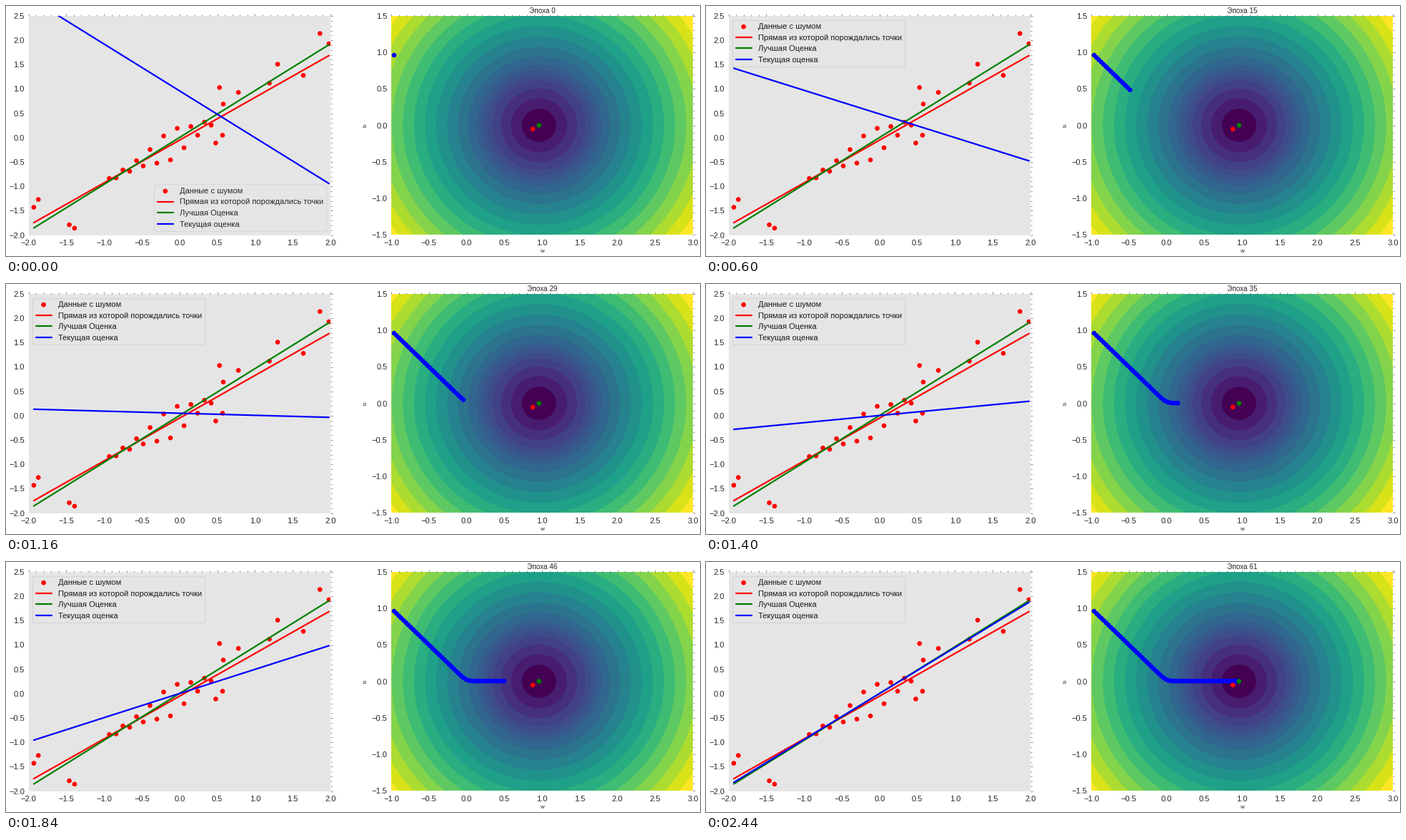
These frames come from a looping animation (971 by 351 pixels, 2480 ms). A matplotlib script:

```python
import numpy as np
import matplotlib.pyplot as plt
from matplotlib.animation import FuncAnimation
from matplotlib.patches import Ellipse
from matplotlib.ticker import AutoMinorLocator, MultipleLocator

W, H, DPI = 971, 351, 80
FRAMES, INTERVAL = 62, 40
LEGEND_SWITCH = 15          # the line leaves the upper left corner here

plt.rcParams.update({
    "font.family": "Liberation Sans",
    "font.size": 10,
    "text.color": "#262626",
    "lines.linewidth": 2,
    "lines.solid_capstyle": "round",
    "legend.scatterpoints": 1,
})

BEST = (0.963, 0.003)
TRUE = (0.878, -0.052)
START = (-0.962, 0.962)
STEP, SOFT = 0.0317, 0.03


def line(w, b, x):
    return w * x + b


def noisy_points():
    """An even zigzag about the true line, widest in the middle, plus outliers."""
    k = np.arange(16)
    x = -0.93 + 0.09 * k
    noise = (-1.0) ** k * 0.3 / (1 + ((k - 9) / 3) ** 2)
    outliers = [(-1.93, -1.43), (-1.87, -1.27), (-1.46, -1.79), (-1.39, -1.86),
                (0.48, -0.11), (0.53, 1.03), (0.57, 0.05), (0.58, 0.69),
                (0.78, 0.93), (1.19, 1.12), (1.3, 1.51), (1.64, 1.28),
                (1.86, 2.14), (1.98, 1.93)]
    return np.vstack([np.c_[x, line(*TRUE, x) + noise], outliers])


def ring_radii():
    """Contour rings of even width that crowd together around the fifth."""
    k = np.arange(1, 19)
    widths = 15.5 - 9 * np.exp(-((k - 5) / 2.2) ** 2)
    return (24 + np.append(0, np.cumsum(widths))) / 105.5


def approach(start, goal, n):
    """Constant steps that slow down softly close to the goal."""
    gap = abs(goal - start) - STEP * n
    return goal - np.sign(goal - start) * SOFT * np.logaddexp(0, gap / SOFT)


points = noisy_points()
span = np.array([points[:, 0].min(), points[:, 0].max()])
path = np.column_stack([approach(s, g, np.arange(FRAMES))
                        for s, g in zip(START, BEST)])


def add_axes(x0, x1, y0, y1, xlim, ylim):
    ax = fig.add_axes([x0 / W, 1 - y1 / H, (x1 - x0) / W, (y1 - y0) / H])
    ax.set(xlim=xlim, ylim=ylim, facecolor="#e5e5e5")
    for spine in ax.spines.values():
        spine.set_visible(False)
    for axis in (ax.xaxis, ax.yaxis):
        axis.set_major_locator(MultipleLocator(0.5))
        axis.set_minor_locator(AutoMinorLocator(5))
    ax.tick_params(which="both", direction="out", color="#555555",
                   labelcolor="#262626", left=False, bottom=False,
                   top=True, right=True, width=0.6)
    ax.tick_params(which="major", length=3)
    ax.tick_params(which="minor", length=1.8)
    ax.tick_params(axis="x", pad=3.3)
    ax.tick_params(axis="y", pad=2)
    return ax


def add_dots(ax, x, y, color):
    return ax.scatter(x, y, s=36, color=color, edgecolors="none")


def label(x, y, text, size, **kw):
    return fig.text(x / W, 1 - y / H, text, size=size, ha="center", **kw)


fig = plt.figure(figsize=(W / DPI, H / DPI), dpi=DPI, facecolor="white")

# data and lines
ax = add_axes(31.5, 454, 14, 321.5, (-2, 2), (-2, 2.5))
dots = add_dots(ax, *points.T, "red")
true_line, best_line, guess = (
    ax.plot(span, line(*wb, span), color=color)[0]
    for wb, color in ((TRUE, "red"), (BEST, "green"), (START, "blue")))

# loss surface
bx = add_axes(539, 961, 14, 321, (-1, 3), (-1.5, 1.5))
radii = ring_radii()
middles = (radii + np.append(0, radii[:-1])) / 2
shades = (middles - middles[0]) / (middles[-1] - middles[0])
for r, shade in zip(radii[::-1], shades[::-1]):
    bx.add_patch(Ellipse((0.96, 0), 2 * r, 2 * r,
                         fc=plt.cm.viridis(shade), lw=0))
trace = add_dots(bx, *START, "blue")
add_dots(bx, *TRUE, "red")
add_dots(bx, 0.96, 0, "green")

title = label(750, 9.5, "", 9, va="baseline")
label(750, 344, "w", 7.2, va="center")
label(503, 168, "b", 7.2, va="center", rotation=90)


def add_legend(loc):
    box = ax.legend([dots, true_line, best_line, guess],
                    ["Данные с шумом",
                     "Прямая из которой порождались точки",
                     "Лучшая Оценка", "Текущая оценка"],
                    loc=loc, facecolor="#e5e5e5",
                    edgecolor="#d4d4d4", framealpha=0.8)
    ax.add_artist(box)
    return box


low = add_legend("lower right")
high = add_legend("upper left")


def update(n):
    guess.set_ydata(line(*path[n], span))
    trace.set_offsets(path[:n + 1])
    title.set_text(f"Эпоха {n}")
    low.set_visible(n < LEGEND_SWITCH)
    high.set_visible(n >= LEGEND_SWITCH)
    return guess, trace, title, low, high


anim = FuncAnimation(fig, update, frames=FRAMES, interval=INTERVAL,
                     init_func=lambda: update(0), repeat=True,
                     repeat_delay=0, blit=False)
plt.show()
```
